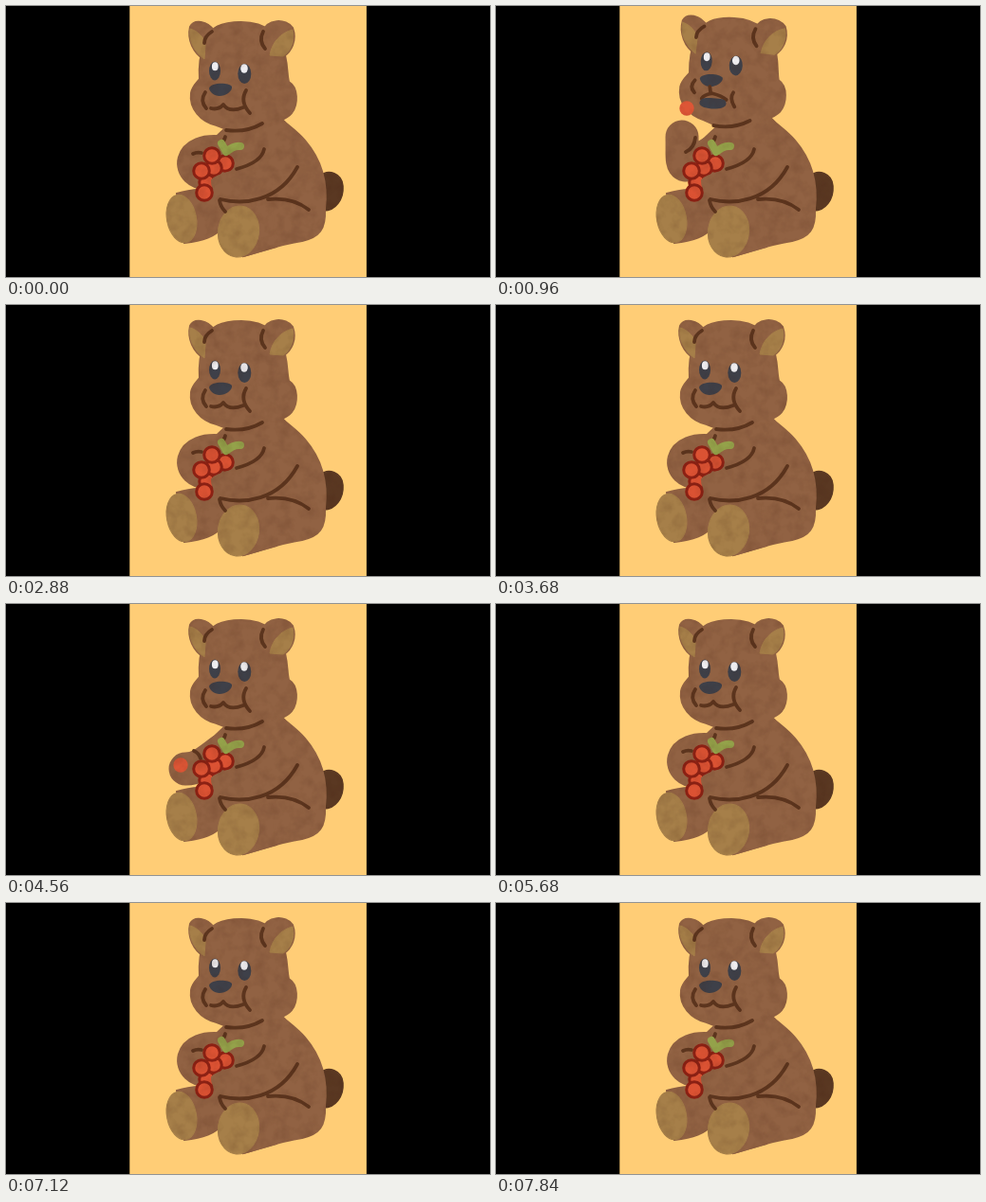
Animation, 510 px wide and 286 px high, one loop 7.92 s. Source, as an HTML page:

```html
<!DOCTYPE html>
<html lang="en">
<head>
<meta charset="utf-8">
<title>Snacking bear</title>
<style>
  html, body { margin: 0; width: 100%; height: 100%; overflow: hidden; background: #000; }
  svg { display: block; width: 100%; height: 100%; }
  .fur { fill: #916243; stroke: #916243; stroke-width: 2; }
  .tan { fill: #a67f49; stroke: #a67f49; }
  .tail { fill: #5a3822; stroke: #5a3822; stroke-width: 1.5; }
  .line { fill: none; stroke: #5c351e; stroke-width: 3.8; stroke-linecap: round; stroke-linejoin: round; }
  .dark { fill: #3e4049; }
  .shine { fill: #eeedf0; }
  .berry { fill: #dd5636; }
  .cluster { fill: #db5233; stroke: #8c2114; stroke-width: 3; }
  .leaf { fill: none; stroke: #94a24a; stroke-width: 8; stroke-linecap: round; stroke-linejoin: round; }
  #arm { fill: none; stroke: #916243; stroke-width: 35; stroke-linecap: round; stroke-linejoin: round; }
</style>
</head>
<body>
<svg viewBox="0 0 510 286">
  <defs>
    <filter id="grain" filterUnits="userSpaceOnUse" x="130" y="0" width="250" height="286" color-interpolation-filters="sRGB">
      <feTurbulence id="noise" type="fractalNoise" baseFrequency="0.08" numOctaves="3" result="n"/>
      <feColorMatrix in="n" values="0 0 0 0 .25  0 0 0 0 .1  0 0 0 0 .04  .3 0 0 0 -.12" result="spots"/>
      <feComposite in="spots" in2="SourceAlpha" operator="in" result="cut"/>
      <feMerge><feMergeNode in="SourceGraphic"/><feMergeNode in="cut"/></feMerge>
    </filter>
  </defs>
  <rect width="510" height="286"/>
  <rect x="130.3" width="249.6" height="286" fill="#ffcd76"/>

  <g filter="url(#grain)">
    <path class="tail" d="M330 180C340 171 354 177 355 190C356 204 347 216 335 216Z"/>
    <path class="fur" d="M232 128C224 136 210 147 206 158L204 195L225 200L228 240L250 264C272 258 290 251 312 248C330 244 337 236 336 214C339 188 333 163 315 142C305 130 290 122 287 114Z"/>
    <path class="fur" d="M180 198C195 193 215 192 228 196L232 230C222 244 205 248 188 250Z"/>
    <ellipse class="tan" cx="185" cy="224.5" rx="15.5" ry="25.5" transform="rotate(-11 185 224.5)"/>
    <path class="fur" d="M232 216C245 207 262 208 280 212L285 254L250 264Z"/>
    <ellipse class="tan" cx="245" cy="238" rx="21.5" ry="27" transform="rotate(8 245 238)"/>

    <path id="arm"/>
    <path id="crease" class="line"/>
    <path class="line" d="M231 138Q230 143 226 147"/>

    <g id="cluster"></g>
    <path class="leaf" d="M227 145L232 154Q240 147 247 148"/>
    <path class="fur" d="M217 184C222 177 242 176 266 164L255 202C232 205 216 197 217 184Z"/>
    <path class="line" d="M272 151C270 162 258 168 243 172"/>
    <path class="line" d="M226 204C250 210 287 207 307 170M276 204C295 202 309 207 319 215M225 205Q226 212 231 217"/>

    <g id="head">
      <path class="fur" d="M210 57C197 50 191 35 194 22C198 14 212 15 220 27Z"/>
      <path class="fur" d="M270 28C275 13 295 13 302 23C307 37 300 48 293 53Z"/>
      <path class="fur" d="M209 40C213 22 228 17 248 17C275 17 290 32 294 52C297 65 296 72 298 80C308 86 308 104 301 113C296 119 288 121 282 124C262 134 240 134 222 126C205 122 193 108 195 92C196 85 202 80 204 77C203 62 205 50 209 40Z"/>
      <path class="tan" d="M209 56C198 48 192 36 194 24C202 26 211 35 210 42Z"/>
      <path class="tan" d="M302 25C305 38 299 49 292 53L278 52C280 38 290 28 302 25Z"/>
      <path class="line" d="M217 27Q209 32 209 39M271 27Q266 37 273 45"/>
      <path class="line" d="M232 131Q253 134 270 124"/>
      <g id="face">
        <ellipse class="dark" cx="220" cy="68.5" rx="6" ry="10"/>
        <ellipse class="shine" cx="220.3" cy="63.8" rx="3.4" ry="4.5"/>
        <ellipse class="dark" cx="251.3" cy="71.5" rx="7" ry="10.5"/>
        <ellipse class="shine" cx="251" cy="66" rx="3.8" ry="4.8"/>
        <path class="dark" d="M214 87C215 81 234 80 238 85C239 90 231 95 225 95C219 95 215 91 214 87Z"/>
        <path id="chew" class="line" d="M210 91Q204 100 211 108M216 108Q224 110 229 104Q235 113 250 107M253 89Q246 101 257 113"/>
        <g id="open">
          <path class="line" d="M209 89Q203 96 209 102M225 95L226 101M217 108Q219 104 228 102Q238 104 243 108M250 100Q246 106 252 115"/>
          <path class="dark" d="M215 113C215 106 224 107 229 107C237 107 244 107 243 113C242 120 215 120 215 113Z"/>
        </g>
      </g>
    </g>
    <circle id="snack" class="berry" r="7.7"/>
  </g>
</svg>
<script>
const $ = id => document.getElementById(id);
const set = (id, name, value) => $(id).setAttribute(name, value);
const show = (id, on) => $(id).style.display = on ? "" : "none";

const STEP = 80, COUNT = 99;
const bites = [12, 33, 62, 82];

// Arm poses: two curve handles, then the hand
const rest = [189, 149, 192, 178, 212, 176];
const pluck = [215, 163, 205, 174, 189, 174];
const out = [208, 176, 190, 176, 169, 164];
const eat = [190, 178, 197, 170, 196, 138];

// Pose keys in steps from the bite
const keys = [[-7, rest], [-5, pluck], [-3, out], [0, eat], [3, rest]];

function armAt(k) {
  const i = keys.findIndex(([at]) => at >= k);
  if (i < 1) return rest;
  const [[a, from], [b, to]] = [keys[i - 1], keys[i]];
  return from.map((v, j) => v + (to[j] - v) * (k - a) / (b - a));
}

const grapes = [[231, 166], [212, 186], [219, 171], [206, 174], [217, 158], [209, 197]];
$("cluster").innerHTML = grapes.map(([x, y]) =>
  `<circle class="cluster" cx="${x}" cy="${y}" r="8.3"/>`).join("");

function draw(step) {
  const bite = bites.find(b => step < b + 3) ?? Infinity;
  const k = step - bite;
  const arm = armAt(k);
  const [hx, hy] = arm.slice(4);
  const lift = Math.abs(k) < 3 ? Math.cos(k * Math.PI / 6) : 0;
  const holding = k >= -5 && k <= 0;

  set("arm", "d", `M228 154C${arm}`);
  set("crease", "d", lift > .4 ? "M210 139Q209 150 200 154"
    : holding ? "M198 155Q203 157 205 163" : "M197 156Q201 154 206 155");

  set("head", "transform", `translate(${-2 * lift} ${-2 * lift}) rotate(${2.9 * lift} 290 115)`);
  set("face", "transform", `translate(${lift} ${-4.7 * lift})`);

  const open = holding && lift > .4;
  show("open", open);
  show("chew", !open);
  set("chew", "transform", `translate(0 ${step % 8 < 4 ? 0 : -1})`);

  show("snack", holding);
  set("snack", "transform", `translate(${hx - 5 + 10 * lift} ${hy - 4 - 26 * lift})`);
  set("noise", "seed", 1 + (step >> 1));
}

const start = performance.now();
let last = -1;
function tick() {
  const step = Math.floor((performance.now() - start) / STEP) % COUNT;
  if (step !== last) draw(last = step);
  requestAnimationFrame(tick);
}
tick();
</script>
</body>
</html>
```
